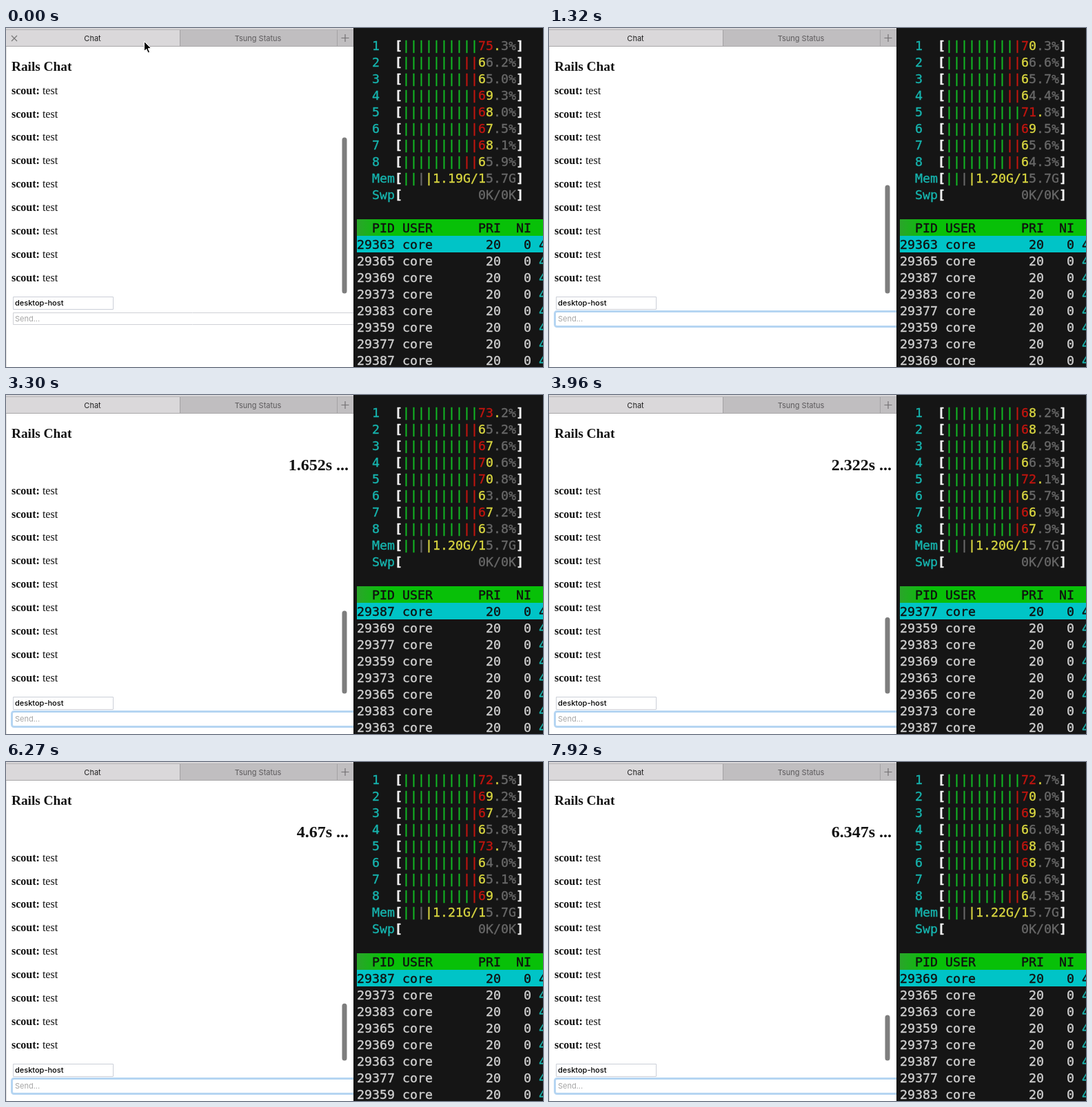
Animation of 779 by 491 pixels, one loop 8 s. Source, as an HTML page with a canvas:

```html
<!DOCTYPE html>
<html lang="en">
<head>
<meta charset="utf-8">
<title>Chat load</title>
<style>
html, body { margin: 0; width: 100%; height: 100%; overflow: hidden; background: #fff; }
canvas { display: block; width: 779px; height: 491px; }
</style>
</head>
<body>
<canvas id="stage" width="779" height="491"></canvas>
<script>
const ctx = document.getElementById('stage').getContext('2d');
const LOOP = 8000, STEP = 330;
const MONO = '18.27px "DejaVu Sans Mono", monospace';
const UI = '11px Inter, sans-serif';
const SERIF = '"Liberation Serif", serif';
const C = { panel: '#151515', green: '#12b624', red: '#c0150f', yellow: '#d9d640',
  dim: '#686868', cyan: '#16b4ae', text: '#d0d0d0', white: '#f2f2f2', ink: '#101010' };

const FOCUS_AT = 990, HIDE_CURSOR_AT = 1320, SENT_AT = 1980;
const REFRESH_AT = 330, REFRESH_EVERY = 1565;
const WORKERS = ['59', '63', '65', '69', '73', '77', '83', '87'];

const secondsSinceSend = t => +((t - 1675) * 1.01633 / 1000).toFixed(3);
// The thumb shrinks ever more slowly as messages pile up.
const thumbHeight = t => 226 - 60.5 * (t / 1000) ** 0.47;
const refreshCount = t => Math.floor((t - REFRESH_AT) / REFRESH_EVERY) + 1;
const usedMemory = tick => (1.1945 + 0.001 * tick * tick).toFixed(2);

function seededRandom(seed) {
  let state = seed * 7919 + 17;
  return () => {
    state = Math.imul(state ^ (state >>> 15), 0x2c1b3c6d) + 0x9e3779b9 | 0;
    return ((state ^ (state >>> 13)) >>> 0) / 2 ** 32;
  };
}

function shuffled(items, random) {
  return items.map(item => [random(), item]).sort((a, b) => a[0] - b[0]).map(pair => pair[1]);
}

function rect(x, y, w, h, color) {
  ctx.fillStyle = color;
  ctx.fillRect(x, y, w, h);
}

function text(s, x, y, font, color, align = 'left') {
  ctx.font = font;
  ctx.fillStyle = color;
  ctx.textAlign = align;
  ctx.fillText(s, x, y);
}

function lines(segments, color, width) {
  ctx.strokeStyle = color;
  ctx.lineWidth = width;
  ctx.beginPath();
  for (const [x0, y0, x1, y1] of segments) {
    ctx.moveTo(x0, y0);
    ctx.lineTo(x1, y1);
  }
  ctx.stroke();
}

function box(x, y, w, h, radius, color, width) {
  ctx.beginPath();
  ctx.roundRect(x, y, w, h, radius);
  ctx.strokeStyle = color;
  ctx.lineWidth = width;
  ctx.stroke();
}

// Terminal text sits on an 11 by 24 grid; a hairline outline gives it weight.
function cell(s, col, row, color, bold = '') {
  const x = 509 + col * 11, y = 32 + row * 24;
  text(s, x, y, bold + MONO, color);
  ctx.strokeStyle = color;
  ctx.lineWidth = 0.35;
  ctx.strokeText(s, x, y);
}

function drawTabs(hovered) {
  rect(0, 0, 504, 27, '#c0bec0');
  rect(0, 0, 504, 3, '#d9d7d9');
  rect(0, 3, 252, 23, '#dad8da');
  rect(0, 2, 504, 1, '#b5b3b5');
  rect(252, 3, 1, 23, '#a3a1a3');
  rect(480, 3, 1, 23, '#a3a1a3');
  rect(0, 26, 504, 1, '#a9a7a9');
  text('Chat', 125.5, 19, UI, '#222', 'center');
  text('Tsung Status', 365.5, 19, UI, '#5c5a5c', 'center');
  lines([[486.5, 14.5, 497.5, 14.5], [492, 9, 492, 20]], '#737173', 1.2);
  if (hovered) lines([[8, 11, 16, 19], [16, 11, 8, 19]], '#777', 1.2);
}

function drawChat(t) {
  const sent = t >= SENT_AT, shift = sent ? 48 : 0;
  rect(0, 27, 504, 464, '#fff');
  rect(0, 27, 1, 464, '#dedede');
  text('Rails Chat', 8, 62, 'bold 19.3px ' + SERIF, '#111');
  if (sent) text(secondsSinceSend(t) + 's ...', 497, 109, 'bold 24px ' + SERIF, '#111', 'right');
  for (let i = 0; i < 9; i++) {
    const y = Math.round(95.6 + shift + i * 33.9);
    text('scout:', 8, y, 'bold 16px ' + SERIF, '#111');
    text('test', 52.9, y, '16px ' + SERIF, '#111');
  }
  box(10.5, 389.5 + shift, 145, 18, 0, '#cbcfd8', 1);
  text('desktop-host', 13, 402 + shift, '500 ' + UI, '#000');
  if (t >= FOCUS_AT) box(8.5, 410.5 + shift, 520, 22, 3, '#b5d5f2', 3);
  else box(10.5, 412.5, 520, 17, 0, '#cfd1d6', 1);
  text('Send...', 13, 425 + shift, UI, '#a5a5a5');

  const height = thumbHeight(t);
  ctx.beginPath();
  ctx.roundRect(487.5, 384.5 + shift - height, 7, height, 3.5);
  ctx.fillStyle = '#7e7e7e';
  ctx.fill();
}

function drawMeter(label, row, value, colorAt) {
  cell(label, 2, row, C.cyan);
  cell('[', 5, row, C.white, 'bold ');
  cell(']', 21, row, C.white, 'bold ');
  [...value].forEach((ch, i) => cell(ch, 6 + i, row, colorAt(i)));
}

function drawCpu(row, percent) {
  const filled = Math.max(10, Math.min(13, Math.round(percent / 4.5 - 3.3)));
  drawMeter(String(row + 1), row, '||||||||||' + percent.toFixed(1) + '%', i =>
    i < filled - 3 ? C.green : i < filled - 1 ? C.red : i < filled ? C.yellow : C.dim);
}

function drawMonitor(t) {
  const tick = refreshCount(t), random = seededRandom(tick + 1);
  rect(504, 0, 275, 491, C.panel);
  for (let row = 0; row < 8; row++) {
    const busier = row % 4 === 0 ? 5 : 0;
    drawCpu(row, 63 + busier + 8 * random());
  }
  drawMeter('Mem', 8, '||||' + usedMemory(tick) + 'G/15.7G', i =>
    i < 2 ? C.green : i === 2 ? C.dim : i < 11 ? C.yellow : C.dim);
  drawMeter('Swp', 9, '0K/0K'.padStart(15), () => C.dim);

  const header = ctx.createLinearGradient(509, 0, 549, 0);
  header.addColorStop(0, '#2aa52a');
  header.addColorStop(1, '#08c008');
  rect(509, 277, 270, 24, header);
  rect(509, 301, 270, 24, '#00c4c7');
  cell('  PID USER      PRI  NI', 0, 11, C.ink);
  shuffled(WORKERS, random).forEach((worker, i) => {
    cell(`293${worker} core       20   0`, 0, 12 + i, i ? C.text : C.ink);
    cell('4', 24, 12 + i, i ? C.cyan : C.ink);
  });
}

function drawArrow(x, y) {
  ctx.beginPath();
  [[0, 0], [0, 14], [3.2, 11], [5.6, 16.6], [8, 15.6], [5.6, 10.2], [10, 10]]
    .forEach(([dx, dy]) => ctx.lineTo(x + dx, y + dy));
  ctx.closePath();
  ctx.fillStyle = '#000';
  ctx.fill();
  ctx.strokeStyle = '#fff';
  ctx.lineWidth = 1;
  ctx.stroke();
}

function drawCaretPointer(x, y) {
  const serifs = [y - 7, y + 7].flatMap(end => [[x - 3.5, end, x - 0.5, end], [x + 0.5, end, x + 3.5, end]]);
  lines([[x, y - 6.5, x, y + 6.5], [x - 1.5, y + 1, x + 1.5, y + 1], ...serifs], '#111', 1);
}

function drawCursor(t) {
  if (t >= HIDE_CURSOR_AT) return;
  const p = t / 660;
  if (p < 1) drawArrow(200.5 - 46 * p, 19.5 + 390 * p);
  else drawCaretPointer(154.5, 417.5);
}

function frame(now) {
  const t = Math.floor((now % LOOP) / STEP) * STEP;
  drawChat(t);
  drawTabs(t < 330);
  drawMonitor(t);
  drawCursor(t);
  requestAnimationFrame(() => frame(performance.now() - start));
}

const start = performance.now();
frame(0);
</script>
</body>
</html>
```
